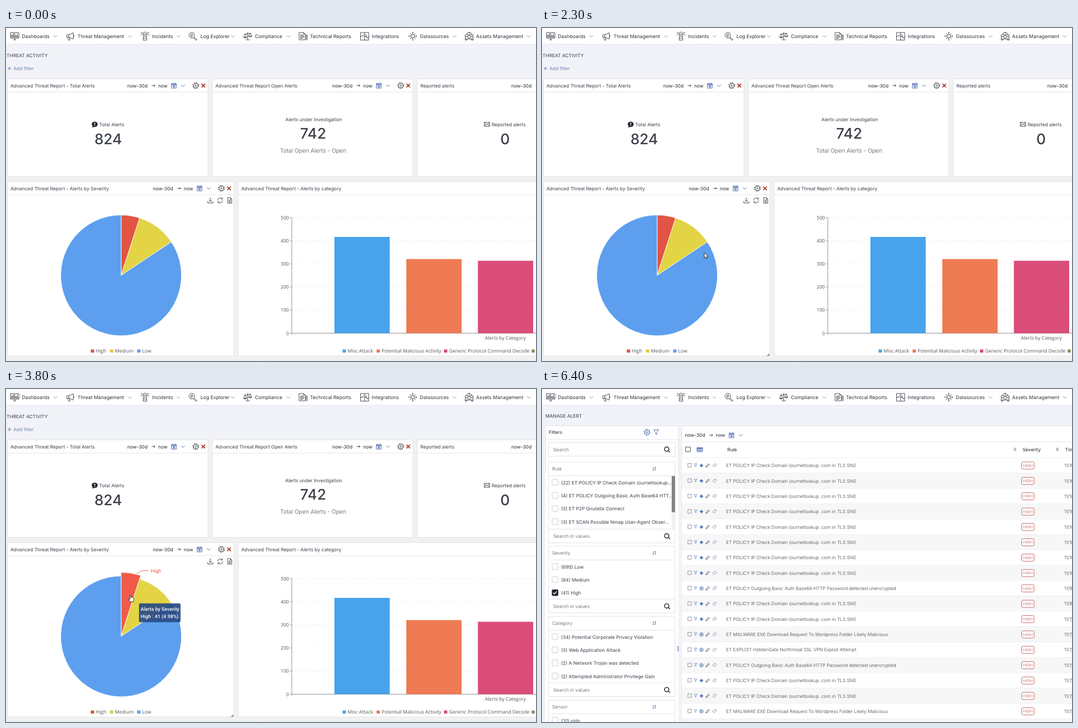
Write an HTML page that moves like this. It is 944 by 593 pixels and loops after 7.6 s.

```html
<!DOCTYPE html>
<html lang="en">
<head>
<meta charset="utf-8">
<title>Threat activity</title>
<style>
html, body { margin: 0; height: 100%; overflow: hidden; background: #f2f3f8; }
svg { display: block; width: 100vw; height: 100vh; }
text { font: 8.4px Inter, sans-serif; fill: #3a3f4c; text-rendering: geometricPrecision; white-space: pre; }
.nav { font-size: 8.7px; fill: #2c313c; }
.dark { fill: #23262e; }
.mid { text-anchor: middle; }
.end { text-anchor: end; }
.big { font-size: 26px; font-weight: 500; fill: #3d404b; }
.sub { font-size: 10.2px; font-weight: 300; fill: #4d5362; }
.link { fill: #7283ae; }
.grey { fill: #777b84; }
.row { font-size: 8.2px; font-weight: 300; fill: #3c3e45; }
.badge { font-size: 6.8px; font-weight: 300; fill: #b84a48; text-anchor: middle; }
.chart { font: 8.6px "Open Sans", sans-serif; fill: #555; }
.tip { font: 500 8.8px Roboto, sans-serif; fill: #fff; }
.tag { font: 8.8px Roboto, sans-serif; }
.box { fill: #fff; stroke: #e2e3e6; }
.i { fill: none; stroke: #3b3e46; stroke-width: .9; stroke-linejoin: round; }
.i.blue { stroke: #4668ad; }
.i.pale { stroke: #8093bd; }
.i.soft { stroke: #7d8089; stroke-width: .8; }
.i.axis { stroke: #85878c; }
.i.red { stroke: #b0352b; stroke-width: 1.7; }
.i.line { stroke: #e4e5e8; stroke-width: 1; }
.i.dash { stroke: #ededef; stroke-dasharray: 3 3; }
.i.lens { stroke: #23262e; stroke-width: 1.4; }
.i.white { stroke: #fff; stroke-width: 1.4; }
.i.solid { fill: #4f79bd; stroke: #4f79bd; }
.slice { stroke: #fff; stroke-width: .8; }
#lift { filter: drop-shadow(0 0 3px rgba(0, 0, 0, .75)); }
</style>
</head>
<body>
<svg id="stage" viewBox="0 0 944 593" preserveAspectRatio="none"></svg>
<script>
const LOOP = 7600, STEP = 100;
const CX = 205, CY = 440.5, R = 107.5;

// Drawing helpers; the y of a text is its visual centre.
const text = (x, y, s, c = '', more = '') => `<text x="${x}" y="${y}" dy=".36em" class="${c}" ${more}>${s}</text>`;
const icon = (x, y, d, c = '') => `<path transform="translate(${x} ${y})" d="${d}" class="i ${c}"/>`;
const rect = (x, y, w, h, fill, more = '') => `<rect x="${x}" y="${y}" width="${w}" height="${h}" fill="${fill}" ${more}/>`;
const box = (x, y, w, h, more = '') => `<rect class="box" x="${x}" y="${y}" width="${w}" height="${h}" ${more}/>`;
const hline = (x, y, x2) => icon(x, y, `M0 0H${x2 - x}`, 'line');
const group = (id, s) => `<g id="${id}">${s}</g>`;
const gear = (x, y, c = '') => `<g transform="translate(${x} ${y})"><circle class="i ${c}" r="4.2"/>
  <circle class="i ${c}" r="5" stroke-dasharray="1.96" style="stroke-width:1.3"/><circle class="i ${c}" r="1.5"/></g>`;

const CHEVRON = 'M-3.3-1.5 0 1.6 3.3-1.5';
const ARROW = 'M-3 0H3M.8-2.2 3 0 .8 2.2';
const CALENDAR = 'M-4.3-3.6h8.6v8.2h-8.6zM-4.3-1.2h8.6M-4.3-2.4h8.6M-2.3-5v2M2.3-5v2M-2.3.8h4.8M-2.3 2.6h4.8M0-.5v4';
const CROSS = 'M-3.2-3.2 3.2 3.2M3.2-3.2-3.2 3.2';
const FUNNEL = 'M-4.4-4.2H4.4L1.2.2V4L-1.2 2.8V.2z';
const LENS = 'M2.4 2.4 5.2 5.2M3.2-.4A3.9 3.9 0 1 1-4.6-.4 3.9 3.9 0 1 1 3.2-.4';
const SORT = 'M-1.7-3.2V3M-2.9 1.8-1.7 3-.5 1.8M1.7 3.2V-3M.5-1.8 1.7-3 2.9-1.8';
const SPIN = 'M-2.2-.9 0-3 2.2-.9zM-2.2.9 0 3 2.2.9z';

const menu = [
  [8, 'Dashboards', 88, 'M0-6H15V3.5H0zM5 6.5H10M7.5 3.5V6.5M2 1V-2H4V1M5.5 1V-4H7.5V1M9 1V-1H11V1M12.5-4V1M0 1.5H15'],
  [107, 'Threat Management', 221, 'M1-2.5H5L13-6V5L5 2H1zM5-2.5V2M3 2 4.5 7H7L6 2.4M13-2.2Q16-.5 13 1.5'],
  [240, 'Incidents', 307, 'M5.5-3.5H9.5L11 7H4zM5-3.5V-6L7.5-7.5 10-6V-3.5M5.2 0H10M4.7 3.5H10.5M0-7 4-5M0-2 4-3.5M15-7 11-5M15-2 11-3.5'],
  [326, 'Log Explorer', 404, 'M10-1.8A5 5 0 1 1 0-1.8 5 5 0 1 1 10-1.8M8.7 1.8 14.5 6 13 7.5 7.5 3M2.5-3.5H7.5M2.5-1.5H7.5M2.5.4H6'],
  [423, 'Compliance', 503, 'M7.5-7V6M4 6.5H11M1.5-3.5 13.5-5.5M3-3.5 0 2H6L3-3.5M12-5.2 9 0H15L12-5.2M0 2Q3 5 6 2M9 0Q12 3 15 0'],
  [521, 'Technical Reports', 0, 'M1-6.5H9L12-3.5V6.5H1zM9-6.5V-3.5H12M3-2H9M3 0H10M3 2H10M3 4H8M13.5-2H15.5V5L14.5 7 13.5 5z'],
  [631, 'Integrations', 0, 'M.5-6.5H15V7H.5zM7.7-6.5V-3Q11-3.5 10.5-1T7.7.5V7M.5.5H4Q3.5-3 6-2T7.7.5M7.7.5H12Q11 4 13 3.5T15 .5'],
  [717, 'Datasources', 799, 'M10.5 0A3 3 0 1 1 4.5 0 3 3 0 1 1 10.5 0M7.5-3V-7M7.5 3V7M4.5 0H.5M10.5 0H14.5M5.4-2.1 2.5-5M9.6-2.1 12.5-5M5.4 2.1 2.5 5M9.6 2.1 12.5 5M6.5-7h2M6.5 7h2M.5-1v2M14.5-1v2'],
  [817, 'Assets Management', 931, 'M1-2.5H15V5H1zM4-2.5Q4-7 8-7T12-2.5M1 5V7H4V5M15 5V7H12V5M10.5 1.2A2.5 2.5 0 1 1 5.5 1.2 2.5 2.5 0 1 1 10.5 1.2M1 1H5.5M10.5 1H15M8-7V-4']
];
const header = rect(0, 0, 944, 29, '#fff') + hline(0, 29, 944) + menu.map(([x, s, chev, d]) =>
  icon(x, 14.5, d) + text(x + 20.3, 14.5, s, 'nav') + (chev ? icon(chev, 14.8, CHEVRON, 'soft') : '')).join('');

const range = (x, y) => text(x, y, 'now-30d', 'dark') + icon(x + 46.5, y, ARROW) + text(x + 55, y, 'now', 'dark') +
  icon(x + 83, y, CALENDAR, 'blue') + icon(x + 99.5, y, CHEVRON, 'blue');
const tools = (x, y) => range(x, y) + gear(x + 122, y) + icon(x + 135.5, y, CROSS, 'red');
const card = (x, y, w, h, title) => box(x, y, w, h) + hline(x, y + 23.5, x + w) + text(x + 5.5, y + 12, title);

function wedge(id, from, to, fill) {
  const at = p => `${R * Math.sin(p * 2 * Math.PI)} ${-R * Math.cos(p * 2 * Math.PI)}`;
  return `<path id="${id}" class="slice" fill="${fill}" d="M0 0L${at(from)}A${R} ${R} 0 ${+(to - from > .5)} 1 ${at(to)}z"/>`;
}

const total = 824;
const slices = [
  { id: 'High', n: 41, fill: '#e25443', hot: '#f05b49', start: 3400, end: 4700, w: 74,
    mark: 'M233 328.5 243 323.5H254', tx: 258, ty: 323.5, ink: '#e25443' },
  { id: 'Medium', n: 88, fill: '#e3d445', hot: '#f8e64f', start: 2800, end: 3400, w: 92,
    mark: 'M273 350 279 346H288', tx: 291.5, ty: 346, ink: '#ea9c4f' },
  { id: 'Low', n: 695, fill: '#5d9fee', hot: '#66aefc', start: 2400, end: 2800, w: 84,
    mark: 'M153 542 146 550H134', tx: 114, ty: 550, ink: '#5d9fee' }
];
let sum = 0;
const pie = slices.map(s => wedge(s.id, sum / total, (sum += s.n) / total, s.fill)).join('');
const marks = slices.map(s => group('mark' + s.id,
  `<path d="${s.mark}" fill="none" stroke="${s.ink}" stroke-width=".8"/>` +
  text(s.tx, s.ty, s.id, 'tag', `style="fill:${s.ink}"`))).join('');
const tips = slices.map(s => group('tip' + s.id, rect(0, 0, s.w, 33.5, 'rgba(42,76,132,.93)', 'rx="2"') +
  text(3, 9.8, 'Alerts by Severity', 'tip') +
  text(3, 23.3, `${s.id} : ${s.n} (${(s.n / total * 100).toFixed(2)}%)`, 'tip'))).join('');
const legend = items => items.map(([x, s, fill]) => rect(x - 3, 572.5, 6, 5.5, fill) + text(x + 6, 575, s, 'chart')).join('');

const axis = [0, 100, 200, 300, 400, 500].map(v => {
  const y = 543.5 - v * .412;
  return (v ? icon(509, y, 'M0 0H435', 'dash') : '') + icon(506, y, 'M0 0H3', 'axis') + text(504, y, v, 'chart end');
}).join('') + icon(509, 337.5, 'M0 0V209M0 206H435', 'axis');
const bars = [[585, 372, '#48a3ec'], [713, 411.5, '#ee7b53'], [840.5, 414.5, '#da4d78']]
  .map(([x, y, fill]) => rect(x, y, 98.5, 543.5 - y, fill)).join('');

const board = rect(0, 90, 944, 503, '#f1f1f2') +
  text(1, 48.5, 'THREAT ACTIVITY') + icon(6, 72, 'M-3.2 0H3.2M0-3.2V3.2', 'blue') + text(13, 72, 'Add filter', 'link') +
  card(2.5, 90.5, 357.5, 174, 'Advanced Threat Report - Total Alerts') + tools(216, 102.5) +
  card(367.5, 90.5, 357.5, 174, 'Advanced Threat Report Open Alerts') + tools(581, 102.5) +
  card(732.5, 90.5, 230, 174, 'Reported alerts') + range(900, 102.5) +
  `<ellipse cx="158" cy="171.5" rx="5.4" ry="4.8" fill="#2b2e36"/><path d="M154 174v3.5l4-2z" fill="#2b2e36"/>` +
  icon(158, 171.5, 'M0-2.8V.6M0 1.7V2.7', 'white') +
  text(166, 172, 'Total Alerts') + text(182, 197.5, '824', 'big mid') +
  text(548, 163, 'Alerts under Investigation', 'mid') + text(547, 188, '742', 'big mid') +
  text(547, 218.5, 'Total Open Alerts - Open', 'sub mid') +
  icon(856.7, 171.5, 'M-4.8-3.5H4.8V3.5H-4.8zL0 .8 4.8-3.5M-4.8 3.5-1.4-.4M4.8 3.5 1.4-.4') +
  text(865, 172, 'Reported alerts') + text(889, 197.5, '0', 'big mid') +
  card(413.5, 273.5, 550, 310.5, 'Advanced Threat Report - Alerts by category') +
  axis + bars + text(853, 552, 'Alerts by Category', 'chart') +
  legend([[602.5, 'Misc Attack', '#48a3ec'], [663, 'Potential Malicious Activity', '#ee7b53'],
    [783, 'Generic Protocol Command Decode', '#da4d78'], [939, '', '#93936a']]) +
  box(2.5, 592, 449, 9) + box(460, 592, 500, 9) +
  group('lift', box(2.5, 273, 404, 311.5)) +
  card(2.5, 273.5, 403.5, 310.5, 'Advanced Threat Report - Alerts by Severity') + tools(261.7, 285.5) +
  icon(364, 307, 'M0-5V2.2M-2.8-.6 0 2.2 2.8-.6M-4.6 1.5V4.6H4.6V1.5') +
  icon(381.5, 307, 'M-4.5 0A4.5 4.5 0 0 1 3.6-2.7M4.5 0A4.5 4.5 0 0 1-3.6 2.7M3.8-5V-2.4H1.2M-3.8 5V2.4H-1.2') +
  icon(398.5, 307, 'M-3.6-5H1.2L3.6-2.6V5H-3.6zM1.2-5V-2.6H3.6M-2-.6H2M-2 1.2H2M-2 3H2') +
  pie + legend([[154, 'High', '#e25443'], [188, 'Medium', '#e6c94b'], [236.5, 'Low', '#5d9fee']]) +
  group('grip', '<path d="M405 579v5h-5z" fill="#9a9a9a"/>') + marks + tips;

const rules = {
  D: 'ET POLICY IP Check Domain (ournetlookup .com in TLS SNI)',
  O: 'ET POLICY Outgoing Basic Auth Base64 HTTP Password detected unencrypted',
  M: 'ET MALWARE EXE Download Request To Wordpress Folder Likely Malicious',
  E: 'ET EXPLOIT HiddenGate Northmoat SSL VPN Exploit Attempt'
};
const rows = [...'DDDDDDDDODDMEODDMD'].map((k, i) => {
  const y = 136.3 + i * 27.35;
  const kind = k === 'D'
    ? icon(284, y, 'M-2.7 0 0-2.7 2.7 0 0 2.7zM-3.2 0H3.2M0-3.2V3.2', 'solid')
    : `<circle class="i blue" cx="284" cy="${y}" r="3.2"/><circle class="i blue" cx="284" cy="${y}" r="1.3"/>`;
  return rect(249, y - 13.7, 695, 27.4, i % 2 ? '#f7f7f8' : '#fff') + hline(249, y + 13.7, 944) +
    icon(263, y - .5, 'M-3.2-3.2H3.2V3.2H-3.2z', 'soft') +
    icon(273.5, y - .5, 'M-2.6-2.6H2.6L.7 0V2.6L-.7 2V0z', 'pale') + kind +
    icon(295, y, 'M-3 3-2.4.8 1.6-3.2 3.2-1.6-.8 2.4z') +
    icon(307, y, 'M-3.2.2 0-2.8H3L3.2-.2 0 2.8z', 'pale') + text(328, y, rules[k], 'row') +
    box(854.5, y - 6.4, 22, 12.8, 'rx="2" style="stroke:#cf6a68"') + text(865.5, y, 'HIGH', 'badge') +
    text(930, y, i < 8 ? '11/10' : i < 10 ? '11/9' : '11/7,', 'row');
}).join('');

const searchBox = (y, s) => text(20, y, s, 'grey') + icon(222.8, y, LENS, 'lens');
const check = (y, on) => rect(18, y - 5.5, 10.5, 10.5, on ? '#22252d' : '#fff', `rx="1.5" stroke="${on ? '#22252d' : '#c9ccd2'}"`) +
  (on ? icon(23.2, y, 'M-3.2-.2-1 2 3.2-2.6', 'white') : '');
const facet = (y, h, title, items, on = -1) => box(11.5, y, 225.5, h) + text(18, y + 12, title, 'grey') +
  icon(200, y + 12, SORT, 'blue') + hline(11.5, y + 24.5, 237) +
  items.map((s, i) => check(y + 36.3 + i * 23.35, i === on) + text(34, y + 36.7 + i * 23.35, s)).join('') +
  hline(11.5, y + h - 24.5, 237) + searchBox(y + h - 12, 'Search in values');
const dots = y => [-3.3, 0, 3.3].map(d => rect(241.5, y + d - 1, 2, 2, '#3f62a8')).join('');

const facets = rect(6, 150, 237, 443, '#fff') +
  facet(130, 144, 'Rule', ['(22) ET POLICY IP Check Domain (ournetlookup...', '(4) ET POLICY Outgoing Basic Auth Base64 HTT...',
    '(3) ET P2P Gnutella Connect', '(3) ET SCAN Possible Nmap User-Agent Obser...']) +
  rect(231, 155, 6, 94, '#f1f1f1') + rect(231, 155, 6, 64.5, '#858585') +
  facet(280, 118.7, 'Severity', ['(695) Low', '(84) Medium', '(41) High'], 2) +
  facet(405, 142.7, 'Category', ['(34) Potential Corporate Privacy Violation', '(3) Web Application Attack',
    '(2) A Network Trojan was detected', '(2) Attempted Administrator Privilege Gain']) +
  facet(554, 120, 'Sensor', ['(31) nids']) + dots(462.5);

const alerts = text(6, 48.2, 'MANAGE ALERT') + box(6.5, 65.5, 236.5, 96.5) +
  text(12, 77, 'Filters', 'dark') + gear(187, 77, 'blue') + icon(203.3, 77, FUNNEL, 'blue') + hline(6.5, 90, 243) +
  box(11.5, 95.5, 226, 24) + searchBox(107.5, 'Search') + group('empty', dots(127.3)) + group('facets', facets) +
  box(249, 65.5, 710, 540) + range(254.5, 82.3) + hline(249, 94, 944) +
  icon(260, 107.5, 'M-4.2-4.2H4.2V4.2H-4.2z') + icon(281, 108, 'M-5-3.5H5V3.8H-5zM-5-1.2H5M-5 1.3H5M-1.7-3.5V3.8M1.7-3.5V3.8M-5-2.7H5', 'blue') +
  text(330, 108, 'Rule', 'dark') + icon(842.3, 107.5, SPIN, 'soft') + text(856, 108, 'Severity', 'dark') +
  icon(918, 107.5, SPIN, 'soft') + text(931.5, 108, 'Time', 'dark') + hline(249, 122.5, 944) + rows;

const pointer = group('arrow', '<path d="M0 0V9.4L2.2 7.5 3.8 11 5.5 10.2 4 6.9H6.9z" fill="#fff" stroke="#222" stroke-width=".9"/>') +
  group('hand', `<path d="M-.8.9Q.2-.4 1.1.9V4.6Q2-.1 2.9 4.9 3.9 3.9 4.5 5.3 5.9 4.5 6.1 6.2V9L5 12.4H-.4L-3.4 8.4Q-3.6 6.6-2 7.4L-.8 8.6z"
    fill="#fff" stroke="#222" stroke-width=".9" stroke-linejoin="round"/>`);

document.getElementById('stage').innerHTML = rect(0, 0, 944, 593, '#f2f3f8') +
  group('board', board) + group('alerts', alerts) + header + pointer;

// Pointer path: time, x, y of the tip.
const path = [
  [600, 787, 308], [700, 690, 306], [800, 520, 300], [900, 440, 295], [1100, 440, 295], [1200, 443, 294],
  [1300, 456, 303], [1500, 600, 400], [1700, 765, 510], [1900, 803, 532], [2000, 740, 515], [2100, 590, 470],
  [2200, 390, 420], [2300, 289, 400], [2400, 277, 399], [2700, 271, 395], [2800, 262, 388], [3100, 244, 376],
  [3300, 227, 368], [3500, 225, 370], [4200, 217, 362], [LOOP, 217, 362]
];
function tipAt(t) {
  const i = Math.max(1, path.findIndex(p => p[0] > t));
  const [a, ax, ay] = path[i - 1], [b, bx, by] = path[i];
  const k = Math.max(0, (t - a) / (b - a));
  return [ax + (bx - ax) * k, ay + (by - ay) * k];
}

const el = id => document.getElementById(id);
const show = (id, on) => { el(id).style.display = on ? '' : 'none'; };
const move = (id, x, y, k = 1) => el(id).setAttribute('transform', `translate(${x} ${y}) scale(${k})`);
const ramp = v => Math.min(1, Math.max(0, v));

function draw(t) {
  const [x, y] = tipAt(t), [lx, ly] = tipAt(t - 200);
  const within = (a, b) => t >= a && t < b;
  show('board', t < 4700);
  show('alerts', t >= 4700);
  show('lift', t >= 4400);
  show('grip', t >= 2200);
  show('empty', t < 5600);
  show('facets', t >= 5600);
  show('arrow', within(600, 2400));
  show('hand', within(2400, 6200));
  move('arrow', x, y);
  move('hand', x, y);
  for (const s of slices) {
    const on = within(s.start, s.end);
    const grow = ramp((t - s.start + 100) / 200) * (on ? 1 : 1 - ramp((t - s.end + 100) / 200));
    move(s.id, CX, CY, 1 + .06 * grow);
    el(s.id).setAttribute('fill', on ? s.hot : s.fill);
    show('mark' + s.id, on);
    show('tip' + s.id, on);
    move('tip' + s.id, lx + 13, ly + 13);
  }
}

let start;
function frame(now) {
  start ??= now;
  draw(Math.floor((now - start) % LOOP / STEP) * STEP);
  requestAnimationFrame(frame);
}
draw(0);
requestAnimationFrame(frame);
</script>
</body>
</html>
```
